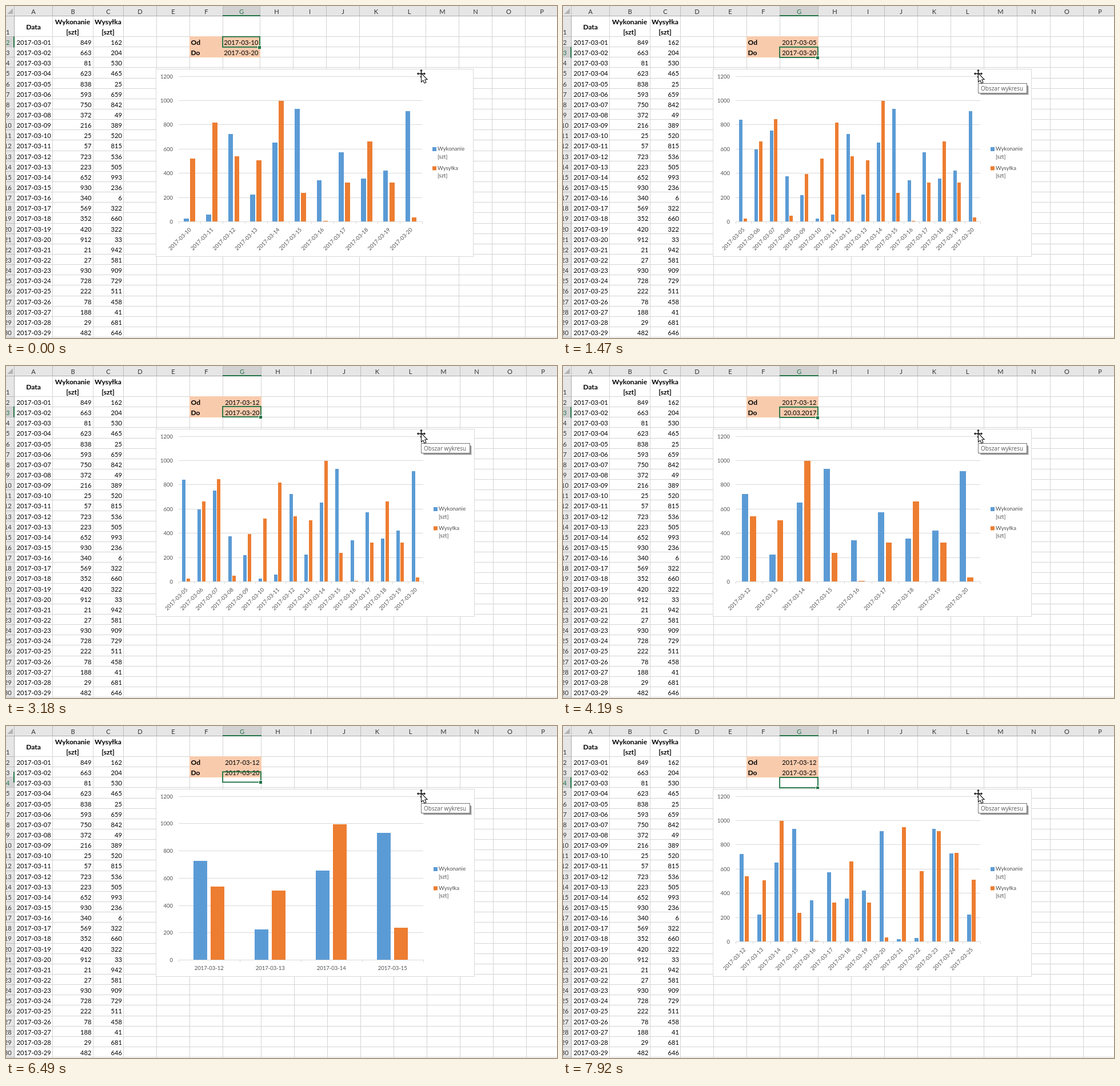
Recreate the animation shown at these times as an HTML page with a canvas. Size 964 by 581 pixels, loop 8.17 s.

```html
<!DOCTYPE html>
<html lang="pl">
<head>
<meta charset="utf-8">
<style>
html, body { margin: 0; width: 100%; height: 100%; overflow: hidden; background: #fff; }
canvas { display: block; width: 964px; height: 581px; }
</style>
</head>
<body>
<canvas id="stage"></canvas>
<script>
const W = 964, H = 581, LOOP = 8170;
const ROW = 18.14, TOP = 53.5;
const GREEN = '#217346', BLUE = '#5b9bd5', ORANGE = '#ed7d31', PEACH = '#f8cbad';
const GRID = '#d4d4d4', AXIS = '#d9d9d9', GREY = '#505050';
const CELL = '11.2px Lato, sans-serif';
const BOLD = 'bold 12.1px Lato, sans-serif';
const SMALL = '9.5px Lato, sans-serif';

const made = [849, 663, 81, 623, 838, 593, 750, 372, 216, 25, 57, 723, 223, 652, 930,
  340, 569, 352, 420, 912, 21, 27, 930, 728, 222, 78, 188, 29, 482];
const sent = [162, 204, 530, 465, 25, 659, 842, 49, 389, 520, 815, 536, 505, 993, 236,
  6, 322, 660, 322, 33, 942, 581, 909, 729, 511, 458, 41, 681, 646];

// Each step patches the state before it. "pos" is the selection frame's row,
// "day" the digits being edited, "caret" one of '', 'day', 'end'.
const steps = [
  [0, { row: 2, pos: 2, from: 10, to: 20, chart: [10, 20], wide: false, tip: false, day: null, caret: '' }],
  [300, { tip: true }],
  [370, { day: '10', caret: 'day' }],
  [540, { day: '1' }],
  [610, { day: '0' }],
  [780, { caret: '' }],
  [860, { caret: 'day' }],
  [1010, { day: '05' }],
  [1170, { caret: '' }],
  [1320, { day: null, from: 5, row: 3, pos: 2.45 }],
  [1400, { pos: 2.9, wide: true }],
  [1470, { pos: 3, chart: [5, 20] }],
  [1790, { row: 2, pos: 2.55 }],
  [1860, { pos: 2 }],
  [2090, { day: '05', caret: 'day' }],
  [2320, { day: '0' }],
  [2400, { day: '1' }],
  [2550, { day: '12' }],
  [2950, { day: null, caret: '', from: 12, row: 3, pos: 2.35 }],
  [3030, { pos: 2.7 }],
  [3100, { pos: 2.88 }],
  [3180, { pos: 2.95 }],
  [3260, { pos: 3, chart: [12, 20] }],
  [4190, { day: '20' }],
  [4270, { caret: 'end' }],
  [4420, { caret: '' }],
  [4580, { caret: 'day' }],
  [4650, { day: '2' }],
  [4720, { day: '' }],
  [4950, { day: '1' }],
  [5180, { day: '15' }],
  [5410, { day: null, caret: '', to: 15, row: 4, pos: 3.42 }],
  [5490, { row: 3, pos: 3, chart: [12, 15] }],
  [5870, { day: '15', caret: 'end' }],
  [6020, { day: '20', caret: 'day' }],
  [6490, { day: null, caret: '', to: 20, row: 4, pos: 3.46 }],
  [6580, { pos: 4, chart: [12, 20] }],
  [6890, { row: 3, pos: 3, day: '20', caret: 'day' }],
  [7040, { caret: '' }],
  [7130, { caret: 'day' }],
  [7510, { day: '2' }],
  [7760, { day: '25' }],
  [7840, { day: null, caret: '', to: 25, row: 4, pos: 3.45 }],
  [7920, { pos: 4, chart: [12, 25] }]
];

const stage = document.getElementById('stage');
const ratio = window.devicePixelRatio || 1;
stage.width = W * ratio;
stage.height = H * ratio;
const c = stage.getContext('2d');
c.scale(ratio, ratio);

const date = day => '2017-03-' + String(day).padStart(2, '0');
const lineY = row => Math.floor(TOP + ROW * (row - 2));
const baseY = row => Math.round(68 + ROW * (row - 2));

function box(x, y, w, h, color) {
  c.fillStyle = color;
  c.fillRect(x, y, w, h);
}

function text(str, x, y, align = 'left', font = CELL, color = '#000') {
  c.font = font;
  c.textAlign = align;
  c.fillStyle = color;
  c.fillText(str, x, y);
}

function shape(points, fill, stroke, width = 1) {
  c.beginPath();
  points.forEach(([x, y]) => c.lineTo(x, y));
  c.closePath();
  if (stroke) {
    c.strokeStyle = stroke;
    c.lineWidth = width;
    c.stroke();
  }
  c.fillStyle = fill;
  c.fill();
}

function columnLines(edge) {
  const xs = [14, 81, 152, 205, 263, 321, 379];
  for (let x = edge; x < W + 58; x += 58) xs.push(x);
  return xs;
}

function drawSheet(s, edge) {
  const xs = columnLines(edge);
  box(0, 0, W, H, '#fff');
  xs.forEach(x => box(x, 18, 1, H, GRID));
  for (let r = 2; r < 32; r++) box(15, lineY(r), W, 1, GRID);
  box(321, 53, edge - 320, 37, PEACH);

  // headers
  box(0, 0, W, 18, '#e6e6e6');
  box(0, 0, 15, H, '#e6e6e6');
  box(379, 0, edge - 379, 17, '#d2d2d2');
  box(0, lineY(s.row), 14, 18, '#d2d2d2');
  xs.forEach(x => box(x, 0, 1, 17, '#bcbcbc'));
  for (let r = 2; r < 32; r++) box(0, lineY(r), 14, 1, '#bcbcbc');
  box(0, 17, W, 1, '#ababab');
  box(14, 17, 1, H, '#ababab');
  box(379, 16, edge - 378, 2, GREEN);
  box(13, TOP + ROW * (s.pos - 2), 2, 19, GREEN);
  shape([[12, 4], [12, 14], [2, 14]], '#b4b4b4');
  for (let i = 0; i < xs.length - 1; i++) {
    const color = i === 6 ? GREEN : '#333';
    text(String.fromCharCode(65 + i), (xs[i] + xs[i + 1] + 1) / 2, 13.5, 'center', CELL, color);
  }
  for (let r = 1; r <= 30; r++) {
    text(r, 3.2, r === 1 ? 50 : baseY(r), 'center', CELL, r === s.row ? GREEN : '#333');
  }

  // table
  text('Data', 48, 41, 'center', BOLD);
  text('Wykonanie', 116.5, 32, 'center', BOLD);
  text('Wysyłka', 178.5, 32, 'center', BOLD);
  text('[szt]', 116.5, 50, 'center', BOLD);
  text('[szt]', 178.5, 50, 'center', BOLD);
  made.forEach((n, i) => {
    const y = baseY(i + 2);
    text(date(i + 1), 48.7, y, 'center');
    text(n, 149.5, y, 'right');
    text(sent[i], 203, y, 'right');
  });
}

function drawInputs(s, edge) {
  const right = edge - 2.5;
  text('Od', 323.5, baseY(2), 'left', BOLD);
  text('Do', 323.5, baseY(3), 'left', BOLD);
  [s.from, s.to].forEach((day, i) => {
    const row = i + 2;
    const editing = s.day !== null && s.row === row;
    const rest = '.03.2017';
    text(editing ? s.day + rest : date(day), right, baseY(row), 'right');
    if (editing && s.caret) {
      const x = s.caret === 'end' ? right : right - c.measureText(rest).width - 0.8;
      box(Math.floor(x), lineY(row) + 1, 1, 18, '#000');
    }
  });

  const y = TOP + 0.2 + ROW * (s.pos - 2);
  const low = Math.round(y + ROW);
  c.strokeStyle = GREEN;
  c.lineWidth = 1.9;
  c.strokeRect(379.1, y, edge - 379.1, ROW);
  box(edge - 4, low - 3, 6, 6, '#fff');
  box(edge - 3, low - 2, 5, 5, GREEN);
}

function drawLegend(x, y, color, name) {
  box(x, y - 3, 7, 7, color);
  text(name, x + 9, y + 3, 'left', SMALL, GREY);
  text('[szt]', x + 9, y + 16.5, 'left', SMALL, GREY);
}

function drawChart(s, shift) {
  const [first, last] = s.chart;
  const count = last - first + 1;
  const flat = count < 5;
  const left = 301.75, right = 727.75 + shift, top = 123, bottom = flat ? 409.5 : 377.5;
  const slot = (right - left) / count;
  const bar = slot / 4.46;
  const yOf = v => Math.floor(bottom - (bottom - top) * v / 1200);

  box(262, 110, 556 + shift, 329, AXIS);
  box(263, 111, 554 + shift, 327, '#fff');
  for (let v = 0; v <= 1200; v += 200) {
    const y = yOf(v);
    box(302, y, 426 + shift, 1, AXIS);
    text(v, 292, y + 3.5, 'right', SMALL, GREY);
  }
  for (let i = 0; i <= count; i++) box(Math.round(left + slot * i), bottom, 1, 4, AXIS);

  for (let i = 0; i < count; i++) {
    const day = first + i;
    const mid = left + slot * (i + 0.5);
    [[made, BLUE, mid - 1.135 * bar], [sent, ORANGE, mid + 0.135 * bar]].forEach(([data, color, x]) => {
      const y = yOf(data[day - 1]);
      const x0 = Math.round(x);
      box(x0, y, Math.round(x + bar) - x0, yOf(0) - y, color);
    });
    if (flat) {
      text(date(day), mid, 426.5, 'center', SMALL, GREY);
    } else {
      c.save();
      c.translate(mid + 0.8, 389.7);
      c.rotate(-Math.PI / 4);
      text(date(day), 0, 3.4, 'right', SMALL, GREY);
      c.restore();
    }
  }
  drawLegend(746 + shift, 250, BLUE, 'Wykonanie');
  drawLegend(746 + shift, 283.5, ORANGE, 'Wysyłka');
}

function drawTip() {
  box(731, 140, 84, 16, 'rgba(0,0,0,0.15)');
  box(730, 139, 84, 16, 'rgba(0,0,0,0.3)');
  box(726, 135, 86, 18, '#767676');
  box(727, 136, 84, 16, '#fff');
  text('Obszar wykresu', 731, 147.8, 'left', '10px "Open Sans", sans-serif', '#575757');
}

function drawPointer() {
  const arm = [[-0.7, -0.7], [-0.7, -5], [-2.5, -5], [0, -7.5], [2.5, -5], [0.7, -5], [0.7, -0.7]];
  const cross = [];
  for (let q = 0; q < 4; q++) {
    const cos = [1, 0, -1, 0][q], sin = [0, 1, 0, -1][q];
    arm.forEach(([x, y]) => cross.push([x * cos - y * sin, x * sin + y * cos]));
  }
  c.save();
  c.translate(726.5, 118.5);
  shape(cross, '#000');
  shape([[0.5, 0.5], [0.5, 13.5], [3.5, 10.8], [5.8, 16], [7.8, 15.1], [5.6, 10], [9.5, 9.7]], '#fff', '#000', 2);
  c.restore();
}

function stateAt(t) {
  return Object.assign({}, ...steps.filter(([at]) => at <= t).map(([, patch]) => patch));
}

function draw() {
  const s = stateAt(performance.now() % LOOP);
  const shift = s.wide ? 2 : 0;
  drawSheet(s, 444 + shift);
  drawInputs(s, 444 + shift);
  drawChart(s, shift);
  if (s.tip) drawTip();
  drawPointer();
  requestAnimationFrame(draw);
}
draw();
</script>
</body>
</html>
```
